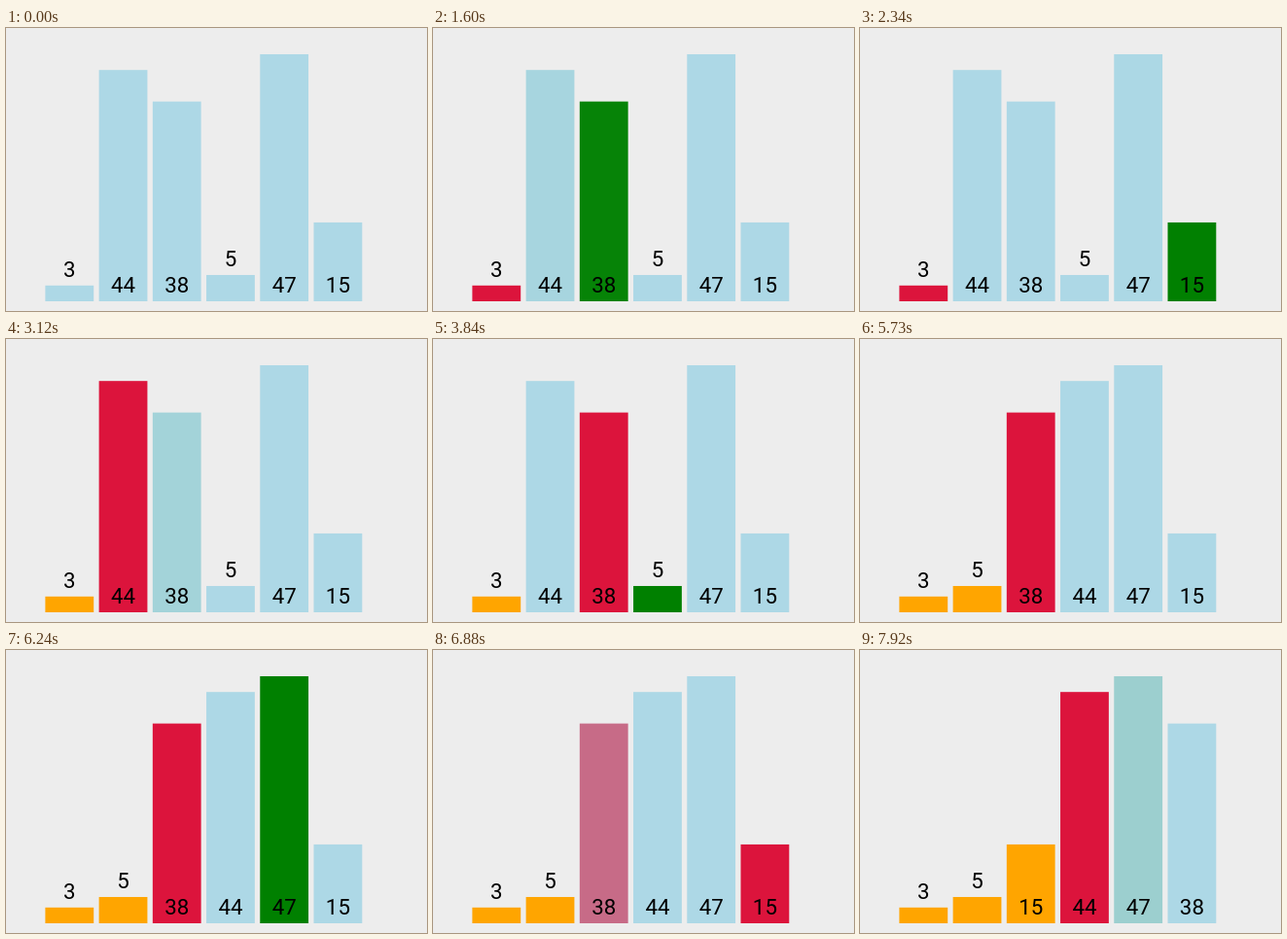
Animation, 433 px wide and 291 px high, one loop 8 s. Source, as an HTML page:

```html
<!DOCTYPE html>
<html lang="en">
<head>
<meta charset="utf-8">
<title>Selection sort</title>
<style>
  html, body { margin: 0; width: 100%; height: 100%; overflow: hidden; background: #ededed; }
  svg { display: block; width: 100%; height: 100%; }
  text { font: 22.3px Roboto, Arial, sans-serif; text-anchor: middle; fill: #000; }
</style>
</head>
<body>
<svg id="chart" viewBox="0 0 433 291"></svg>
<script>
const NS = "http://www.w3.org/2000/svg";
const LOOP = 8000, TICK = 80, FADE = 225;
const LEFT = 40.4, PITCH = 55.22, WIDTH = 49.8, FLOOR = 281, UNIT = 5.405;

const COLORS = {
  blue: [173, 216, 230],
  green: [0, 128, 0],
  red: [220, 20, 60],
  orange: [255, 165, 0]
};

// Each step: start time, new colour by bar value, new slot by bar value.
const STEPS = [
  [900, { 3: "red" }],
  [1160, { 44: "green" }],
  [1420, { 44: "blue", 38: "green" }],
  [1652, { 38: "blue", 5: "green" }],
  [1885, { 5: "blue", 47: "green" }],
  [2117, { 47: "blue", 15: "green" }],
  [2350, { 15: "blue" }],
  [2590, { 3: "orange" }],
  [2795, { 44: "red" }],
  [3065, { 38: "green" }],
  [3340, { 44: "blue", 38: "red" }],
  [3615, { 5: "green" }],
  [3890, { 38: "blue", 5: "red" }],
  [4150, { 47: "green" }],
  [4425, { 47: "blue", 15: "green" }],
  [4700, { 15: "blue", 44: "red" }],
  [4956, {}, { 44: 3, 5: 1 }],
  [5212, { 5: "orange", 44: "blue" }],
  [5468, { 38: "red" }],
  [5724, { 44: "green" }],
  [5980, { 44: "blue", 47: "green" }],
  [6241, { 47: "blue", 15: "green" }],
  [6502, { 38: "blue", 15: "red" }],
  [6763, { 38: "red" }],
  [7037, {}, { 38: 5, 15: 2 }],
  [7330, { 15: "orange", 38: "blue" }],
  [7585, { 44: "red" }],
  [7854, { 47: "green" }]
];

const mix = (a, b, p) => a + (b - a) * p;
const ease = p => p < 0.5 ? 4 * p ** 3 : 1 - 4 * (1 - p) ** 3;

function add(parent, tag, attrs) {
  const node = document.createElementNS(NS, tag);
  for (const key in attrs) node.setAttribute(key, attrs[key]);
  return parent.appendChild(node);
}

const chart = document.getElementById("chart");
const bars = [3, 44, 38, 5, 47, 15].map((value, slot) => {
  const height = value * UNIT;
  const group = add(chart, "g", {});
  const rect = add(group, "rect", { y: FLOOR - height, width: WIDTH, height });
  const label = add(group, "text", {
    x: WIDTH / 2,
    y: value < 10 ? FLOOR - height - 9 : FLOOR - 9
  });
  label.textContent = value;
  return { value, slot, group, rect };
});

function draw(time) {
  for (const { value, slot, group, rect } of bars) {
    let color = COLORS.blue, place = slot;
    for (const [start, paint, move = {}] of STEPS) {
      if (time < start) break;
      const p = ease(Math.min(1, (time - start) / FADE));
      if (value in paint) {
        const goal = COLORS[paint[value]];
        color = color.map((c, i) => mix(c, goal[i], p));
      }
      if (value in move) place = mix(place, move[value], p);
    }
    rect.setAttribute("fill", `rgb(${color.map(Math.round)})`);
    group.setAttribute("transform", `translate(${LEFT + place * PITCH} 0)`);
  }
}

const begin = performance.now();
function frame() {
  const time = (performance.now() - begin) % LOOP;
  draw(Math.floor(time / TICK) * TICK);
  requestAnimationFrame(frame);
}
draw(0);
requestAnimationFrame(frame);
</script>
</body>
</html>
```
